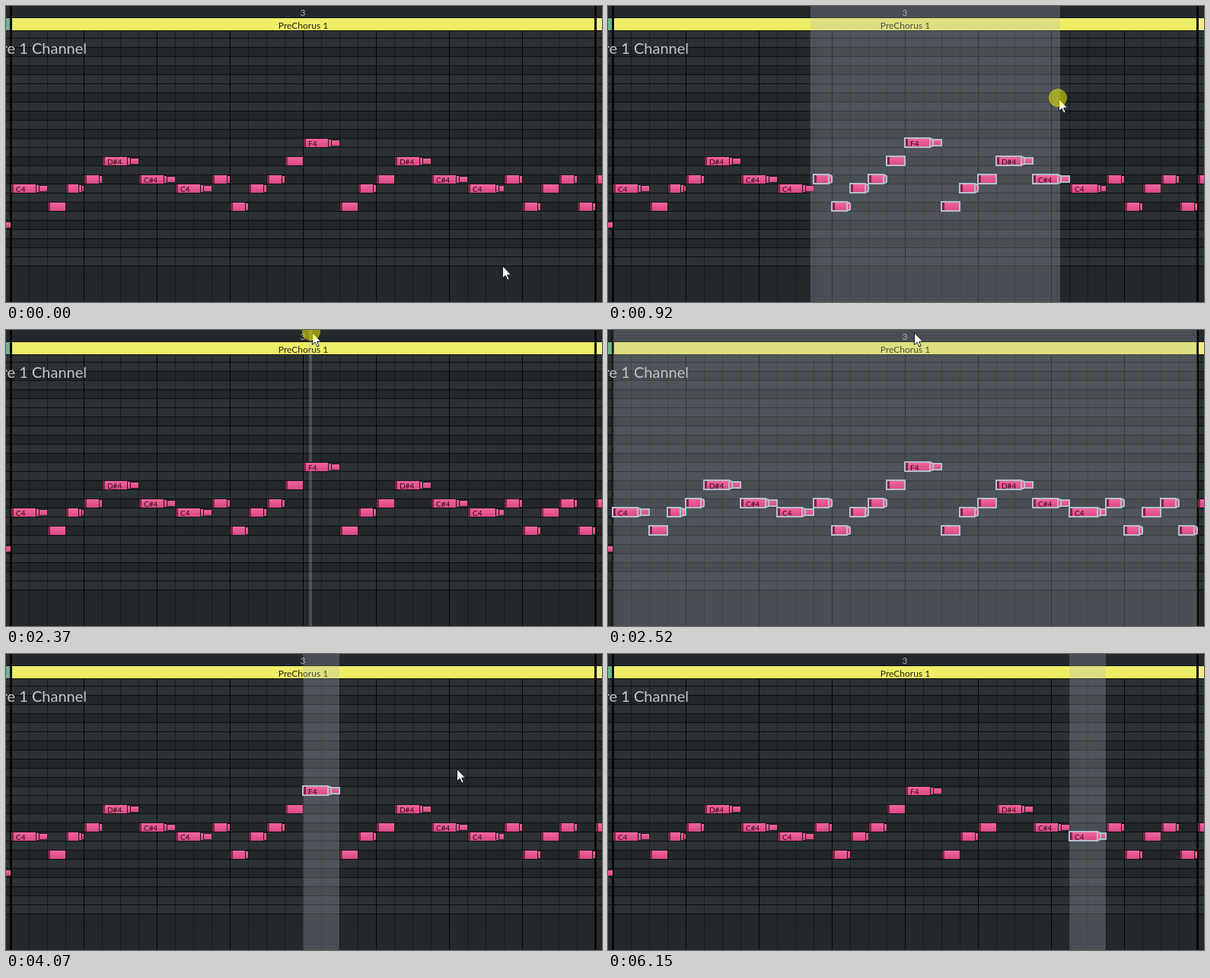
An HTML page that plays this animation: 783 by 390 pixels, repeating every 6.31 s.

```html
<!DOCTYPE html>
<html lang="en">
<head>
<meta charset="utf-8">
<title>Time selection in a note editor</title>
<style>
  html, body { margin: 0; width: 100%; height: 100%; overflow: hidden; background: #24282b; }
  svg { display: block; width: 783px; height: 390px; }
  text { font-family: Lato, "Open Sans", sans-serif; }
  .outline { fill: none; stroke: #b4bdcd; stroke-width: 2; }
</style>
</head>
<body>
<svg viewBox="0 0 783 390">
  <defs>
    <linearGradient id="pink" x1="0" y1="0" x2="0" y2="1">
      <stop offset="0" stop-color="#f2649c"/>
      <stop offset="1" stop-color="#da4883"/>
    </linearGradient>
  </defs>
  <g id="grid"></g>
  <text x="390" y="13" font-size="12" fill="#a9adb0" text-anchor="middle">3</text>
  <text x="390.5" y="30" font-size="12" fill="#26261a" text-anchor="middle">PreChorus 1</text>
  <text x="106" y="63" font-size="20" fill="#c6c9cb" text-anchor="end">re 1 Channel</text>
  <rect id="range" height="390" fill="rgb(178,182,194)" fill-opacity=".267"/>
  <g id="notes"></g>
  <g id="pointer">
    <path d="M1.5 1.5V17.5L5.2 14.1L7.8 20L10.2 19L7.7 13.2H12.6Z" fill="#fff" stroke="#15171a"/>
    <circle id="press" r="12" fill="#ff0" fill-opacity=".5"/>
  </g>
</svg>
<script>
const LOOP = 6310, FRAME = 77;
const LEFT = 6, STEP = 24, BEAT = 4 * STEP, RIGHT = LEFT + 8 * BEAT, ROW = 12;
const PITCHES = 'C C# D D# E F F# G G# A A# B'.split(' ');
const $ = id => document.getElementById(id);

function add(parent, tag, attrs) {
  const el = document.createElementNS('http://www.w3.org/2000/svg', tag);
  for (const k in attrs) el.setAttribute(k, attrs[k]);
  parent.appendChild(el);
  return el;
}
const box = (parent, x, y, width, height, fill) => add(parent, 'rect', { x, y, width, height, fill });
const show = (el, on) => el.setAttribute('visibility', on ? 'visible' : 'hidden');

const keyOf = name => 12 * name.slice(-1) + PITCHES.indexOf(name.slice(0, -1));
const topOf = key => 174 + ROW * (keyOf('F4') - key);

function drawGrid() {
  const g = $('grid');
  for (let key = keyOf('E3') - 1; topOf(key) > 20; key++) {
    const black = PITCHES[key % 12].includes('#');
    box(g, 0, topOf(key), 783, ROW, black ? '#23272a' : '#2c3134');
    box(g, 0, topOf(key), 783, 1, '#0d0f11');
  }
  for (let x = LEFT + STEP; x < RIGHT; x += STEP) {
    box(g, x, 33, 1, 357, (x - LEFT) % BEAT ? 'rgba(0,0,0,.35)' : '#050607');
  }
  box(g, 0, 0, 783, 33, '#0d0f11');
  box(g, 0, 0, 783, 15, '#24282b');
  box(g, 0, 16, LEFT, 16, '#6fb58a');
  box(g, LEFT, 16, RIGHT - LEFT, 16, '#eeee66');
  box(g, RIGHT, 16, 20, 16, '#f2f08a');
  for (const x of [LEFT, RIGHT]) box(g, x - 1, 0, 3, 390, '#050607');
}

// Name and body width; the rest of the one or two steps is release
const MELODY = `C4/33 A#3/24 C4/17 C#4/20 D#4/33 C#4/33 C4/33 C#4/20 A#3/20 C4/20 C#4/20 D#4/24
  F4/33 A#3/24 C4/20 C#4/24 D#4/33 C#4/33 C4/37 C#4/20 A#3/20 C4/24 C#4/20 A#3/20 C#4/24`;

function drawNote(start, name, body) {
  const g = add($('notes'), 'g', {});
  const top = topOf(keyOf(name));
  const length = body > STEP ? 2 * STEP : STEP;
  const tip = Math.min(4, length - body);
  let x = start;
  const parts = [body, tip, length - body - tip].map((width, i) => {
    const part = { x, y: top + i, width, height: ROW - 2 * i, rx: i === 1 ? 2 : 0 };
    x += width;
    return part;
  }).filter(p => p.width);

  for (const p of parts) {
    add(g, 'rect', { ...p, fill: '#15171a' });
    box(g, p.x + 1, p.y + 1, p.width - 1, p.height - 1, 'url(#pink)');
  }
  box(g, start + 1, top + 1, 3, ROW - 1, '#7c2549');
  const outline = add(g, 'g', { class: 'outline' });
  parts.forEach(p => add(outline, 'rect', p));
  if (length > STEP) {
    add(g, 'text', { x: start + 7, y: top + 10.5, 'font-size': 10, fill: '#2b0f1c' }).textContent = name;
  }
  return { start, end: start + length, outline };
}

drawGrid();
box($('notes'), 0, topOf(keyOf('G#3')) + 3, LEFT, 7, 'url(#pink)');
const notes = [];
for (const word of MELODY.split(/\s+/)) {
  const [name, body] = word.split('/');
  notes.push(drawNote(notes.at(-1)?.end ?? LEFT, name, +body));
}

// Pointer moves: start, end, goal
const HOME = { x: 651, y: 341 };
const MOVES = [
  [0, 300, 280, 112], [300, 920, 591, 121], [1220, 2060, 401, 2],
  [3070, 3380, 428, 136], [3380, 3530, 415, 179], [3610, 4070, 591, 150],
  [4070, 4380, 539, 203], [4600, 4680, 557, 167], [4680, 5070, 622, 240],
  [5140, 5300, 649, 184], [5530, 5760, 705, 400], [5840, 5990, 749, 388], [6070, 6150, 755, 400]
];

const span = (from, to, range) => ({ from, to, range });
const noteSpan = (from, to, i) => span(from, to, () => [notes[i].start, notes[i].end]);
const active = (list, t) => list.find(s => t >= s.from && t < s.to);

const PRESSES = [span(300, 1300), span(2210, 2290), span(2370, 2520), span(3530, 3690), span(4380, 4450), span(5070, 5140)];
const SELECTIONS = [
  span(300, 1460, x => [266, x + 3]),
  span(2210, 2520, x => [x - 3, x + 1]),
  span(2520, 3230, () => [LEFT, RIGHT]),
  noteSpan(3690, 4380, 12), noteSpan(4680, 5070, 16), noteSpan(5220, LOOP, 18)
];

// Moves slow down towards their goal, one jump per frame
function pointerAt(t) {
  let { x, y } = HOME;
  for (const [from, to, goalX, goalY] of MOVES) {
    if (t < from) break;
    const steps = Math.round((to - from) / FRAME);
    const p = Math.min(1, Math.floor((t - from) / (to - from) * steps) / steps);
    const eased = Math.sin(p * Math.PI / 2);
    x += (goalX - x) * eased;
    y += (goalY - y) * eased;
  }
  return { x: Math.round(x), y: Math.round(y) };
}

function render(t) {
  const { x, y } = pointerAt(t);
  $('pointer').setAttribute('transform', `translate(${x} ${y})`);
  show($('press'), active(PRESSES, t));

  const [left, right] = active(SELECTIONS, t)?.range(x) ?? [0, 0];
  $('range').setAttribute('x', left);
  $('range').setAttribute('width', right - left);
  for (const n of notes) show(n.outline, n.start >= left && n.start < right);
}

const began = performance.now();
function tick() {
  render((performance.now() - began) % LOOP);
  requestAnimationFrame(tick);
}
tick();
</script>
</body>
</html>
```
